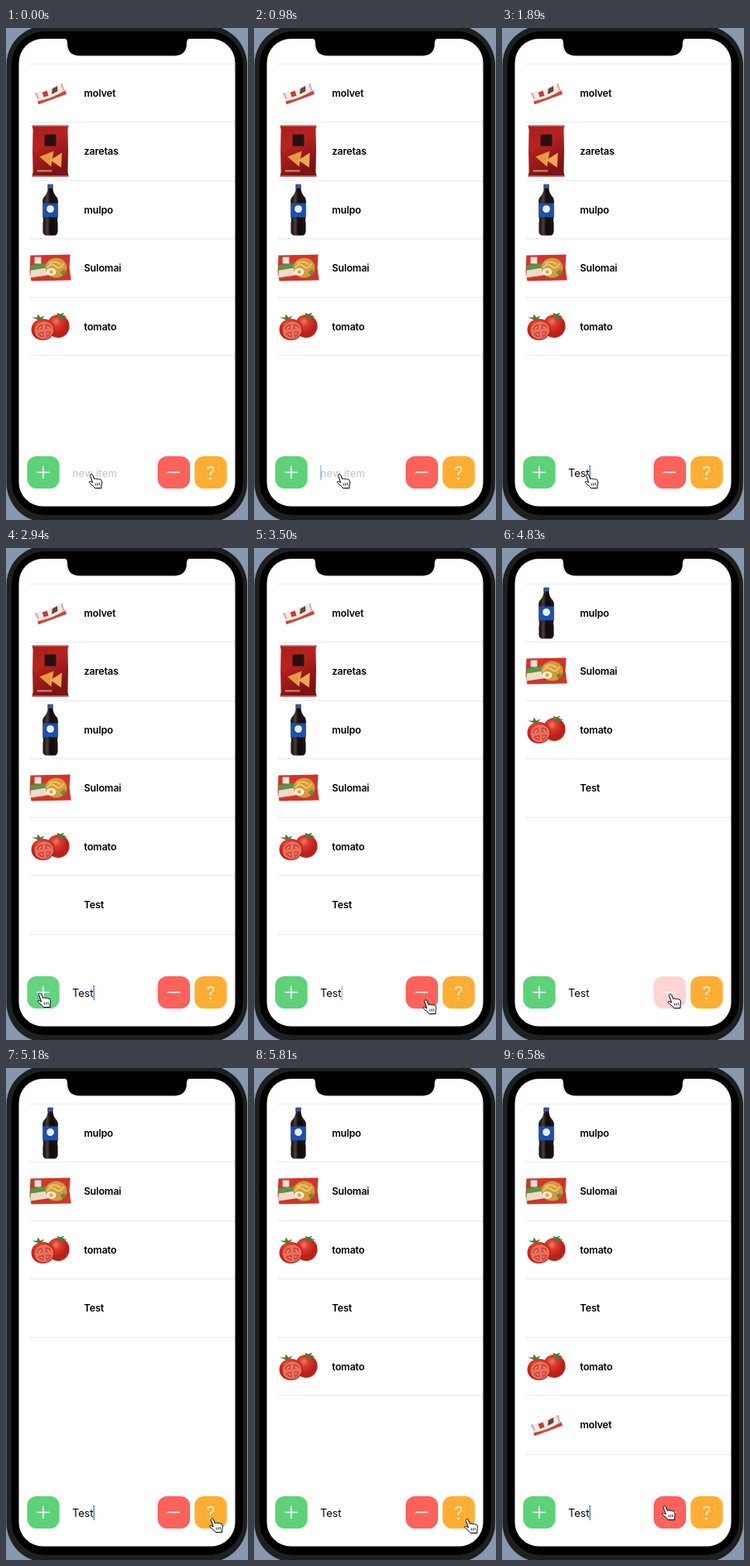
Write an HTML page that moves like this. It is 292 by 594 pixels and loops after 6.65 s.

```html
<!DOCTYPE html>
<html lang="en">
<head>
<meta charset="utf-8">
<title>Shopping list</title>
<style>
  html, body { margin: 0; height: 100%; overflow: hidden; background: #8798ae; }
  svg { display: block; width: 292px; height: 594px; }
  text { font-family: Inter, "Liberation Sans", sans-serif; }
  .label { font-size: 12px; font-weight: 600; letter-spacing: -.2px; }
  .field { font-size: 12.7px; }
  .icon { fill: none; stroke: #fff; stroke-width: 1.6; stroke-linecap: round; }
  .mark { font-size: 21.5px; font-weight: 300; fill: #fff; text-anchor: middle; }
</style>
</head>
<body>
<svg viewBox="0 0 292 594">
  <defs>
    <linearGradient id="bag" x2=".4" y2="1">
      <stop stop-color="#a51f1c"/><stop offset=".4" stop-color="#b9231f"/><stop offset="1" stop-color="#7c1212"/>
    </linearGradient>
    <linearGradient id="glass" x2="1">
      <stop stop-color="#0c0808"/><stop offset=".3" stop-color="#4a3b3a"/><stop offset=".5" stop-color="#120b0b"/><stop offset="1" stop-color="#1b1414"/>
    </linearGradient>
    <radialGradient id="skin" cx=".4" cy=".3">
      <stop stop-color="#f27a66"/><stop offset=".4" stop-color="#dd3b2d"/><stop offset="1" stop-color="#bb2219"/>
    </radialGradient>

    <g id="bar" transform="rotate(-20)">
      <path d="M-18-6H18L17 1 18 8H-18L-17 2Z" fill="#f0ebe7"/>
      <path d="M-18 4Q0 7 18 3V8H-18Z" fill="#cf4434"/>
      <path d="M-18-6h3v8l-2 0zM15-6h3l-1 7 1 3h-3z" fill="#dcb3aa"/>
      <rect x="-9" y="-4" width="6" height="6" fill="#c8382b"/>
      <path d="M1 2 4-4 11-5 9 1Z" fill="#6d4434"/>
    </g>
    <g id="chips">
      <path d="M-22-31H22L21-26Q22 0 21 25L22 31H-22L-21 25Q-22 0-21-26Z" fill="url(#bag)"/>
      <path d="M-22-30H22M-22 30H22" stroke="#c4615a"/>
      <rect x="-7" y="-20" width="14" height="14" fill="#241212"/>
      <path d="M-13 7 4 0 1 19Z" fill="#e89a45"/>
      <path d="M0 11 14 2 13 20Z" fill="#eda950"/>
      <path d="M-16 24H2" stroke="#c98a78" stroke-width="2"/>
    </g>
    <g id="cola">
      <path d="M-3-27H3Q3-20 8-15 10-12 9-7V8Q8 12 9 16V27Q8 31 5 31H-5Q-8 31-9 27V16Q-8 12-9 8V-7Q-10-12-8-15-3-20-3-27Z" fill="url(#glass)"/>
      <rect x="-3.5" y="-31" width="7" height="5" rx="1" fill="#3c5795"/>
      <rect x="-9" y="-8" width="18" height="17" fill="#1d4fae"/>
      <circle cy="-1" r="4.5" fill="#e9edf5"/>
    </g>
    <g id="noodles">
      <path d="M-24-15 24-16 23 0 25 15-23 16-25 5Z" fill="#cf3528"/>
      <path d="M-24 3-5 0-3 9-24 12Z" fill="#ecdcc8"/>
      <path d="M-24-3-3-6V-1L-24 3Z" fill="#4e9a4a"/>
      <rect x="-19" y="-13" width="8" height="8" fill="#f0e4dc"/>
      <ellipse cx="7" cy="0" rx="13" ry="12" fill="#d29a3c"/>
      <path d="M-4 0q5-7 10-2t10-3M-2-5q8-5 14 1" fill="none" stroke="#edc766" stroke-width="2"/>
      <ellipse cx="1" cy="5" rx="6" ry="4.5" fill="#f8f0e2"/><circle cx="1" cy="5" r="2.3" fill="#eda626"/>
      <path d="M12 5l5-3 2 5-4 3z" fill="#6b8a3c"/>
    </g>
    <g id="tomato">
      <ellipse cx="9.5" cy="-.5" rx="13.5" ry="14" fill="url(#skin)"/>
      <path d="M10-12l-6-1 5-1-1-3 4 2 5-2-2 3 6 2-6 0 1 4z" fill="#4c7a35"/>
      <ellipse cx="-9" cy="3.5" rx="14" ry="13" fill="url(#skin)"/>
      <path d="M-15-8l-7-3 6 0 1-4 3 4 5-2-3 4z" fill="#4c7a35"/>
      <ellipse cx="-7.5" cy="4.5" rx="11.5" ry="10.5" fill="#e8705f" transform="rotate(-20 -7.5 4.5)"/>
      <path d="M-16 4q0-6 6-7l1 6zM-6-3q7 0 7 5l-7 1zM-15 8l7-2 0 7q-5 0-7-5zM-5 6l6 0q-1 6-6 7z" fill="#d24536"/>
      <path d="M-14 3l3-3M-4 0l3 2M-12 9l3 1M-4 9l2-1" stroke="#f0b098" stroke-width="1.3"/>
    </g>
  </defs>

  <rect x=".5" y="-3" width="290.5" height="600" rx="48" fill="#1e1f20"/>
  <rect x="6.5" y="4" width="279.5" height="584" rx="41"/>
  <rect x="15.5" y="13" width="261" height="564.5" rx="29" fill="#fff"/>
  <path d="M68 12q6 0 6 6 0 15.5 15 15.5h114q15 0 15-15.5 0-6 6-6z"/>

  <path id="lines" stroke="#ebebed"/>
  <g id="rows"></g>

  <g id="plus">
    <rect x="25.5" y="517" width="39" height="39" rx="11.5" fill="#5dd279"/>
    <path class="icon" d="M38 536.5h14M45 529.5v14"/>
  </g>
  <text id="typed" class="field" x="80" y="541.5"></text>
  <rect id="caret" y="528" width="1.2" height="18" fill="#2f6bdc"/>
  <g id="minus">
    <rect x="183" y="517" width="39" height="39" rx="11.5" fill="#ff625b"/>
    <path class="icon" d="M195.5 536.5h14"/>
  </g>
  <g id="random">
    <rect x="227.5" y="517" width="39" height="39" rx="11.5" fill="#ffad33"/>
    <text class="mark" x="247" y="544.5">?</text>
  </g>
  <g id="hand" stroke="#000" stroke-linejoin="round">
    <path fill="#fff" d="M1.6 2.4C1 .6 4 .1 4.8 1.8L6.6 6.6C7.4 5.6 9.2 5.7 9.6 6.8 10.5 5.9 12.2 6.1 12.6 7.2 13.7 6.5 15 7 15.2 8.2 16 10.5 16 12 15 14L15.2 17.5H7.4C6 14.8 2.8 13.4.6 11-.3 9.8 1.2 8.8 2.6 9.6L4.6 10.8Z"/>
    <path d="M8.4 11.5v3M10.6 11.3v3M12.8 11v3" stroke-width=".8"/>
  </g>
</svg>
<script>
const LOOP = 6650, STEP = 70, FADE = 170;
const $ = id => document.getElementById(id);
const clamp = v => Math.max(0, Math.min(1, v));
const since = (times, t) => times.filter(s => t >= s).length;

// label, picture, time of appearance
const items = [
  ["molvet", "bar", 0], ["zaretas", "chips", 0], ["mulpo", "cola", 0],
  ["Sulomai", "noodles", 0], ["tomato", "tomato", 0],
  ["Test", "", 2780], ["tomato", "tomato", 5640], ["molvet", "bar", 5950]
];
const removals = [4450, 4815];
const keys = [1190, 1610, 1750, 1890];
const presses = {
  plus: [[2660, 2780]],
  minus: [[4340, 4450], [4620, 4815]],
  random: [[5600, 5640]]
};
// caret switches on, off, on, ...
const blinks = [280, 980, 1190, 2100, 2380, 3080, 3500, 3850, 4270, 4690, 5110, 5600, 5950];
// start, end, x, y
const moves = [
  [2380, 2640, 38, 537], [3080, 3490, 204, 545], [3780, 3990, 200, 538],
  [4970, 5250, 254, 544], [6370, 6580, 193, 528]
];

$("rows").innerHTML = items.map(([label, pic]) => `<g>
  ${pic && `<use href="#${pic}" x="53.5" y="35.5"/>`}
  <text class="label" x="94" y="40.4">${label}</text></g>`).join("");
const rows = [...$("rows").children];
const rowTop = i => Math.floor(43 + 70.5 * i);

function drawList(t) {
  const gone = since(removals, t);
  let lines = "M28 43.5H276";
  rows.forEach((row, i) => {
    const shown = i >= gone && t >= items[i][2];
    row.style.display = shown ? "" : "none";
    row.setAttribute("transform", `translate(0 ${rowTop(i - gone)})`);
    if (shown) lines += `M28 ${rowTop(i - gone + 1) + .5}H276`;
  });
  $("lines").setAttribute("d", lines);
}

function drawField(t) {
  const n = since(keys, t), typed = $("typed"), caret = $("caret");
  typed.textContent = n ? "Test".slice(0, n) : "new item";
  typed.style.fill = n ? "#000" : "#c4c4c6";
  caret.setAttribute("x", 80 + (n ? typed.getComputedTextLength() : 0));
  const k = since(blinks, t);
  const part = k ? clamp((t - blinks[k - 1] + STEP) / (2 * STEP)) : 1;
  caret.style.opacity = k % 2 ? part : 1 - part;
}

function drawButtons(t) {
  for (const id in presses) {
    let alpha = 1;
    for (const [down, up] of presses[id])
      if (t >= down) alpha = .2 + .8 * clamp((t - up) / FADE);
    $(id).style.opacity = alpha;
  }
}

function drawHand(t) {
  let x = 100, y = 538;
  for (const [a, b, toX, toY] of moves) {
    const p = clamp((t - a) / (b - a)), e = p * p * (3 - 2 * p);
    x += (toX - x) * e;
    y += (toY - y) * e;
  }
  $("hand").setAttribute("transform", `translate(${x} ${y})`);
}

const start = performance.now();
function frame() {
  const t = Math.floor((performance.now() - start) % LOOP / STEP) * STEP;
  drawList(t);
  drawField(t);
  drawButtons(t);
  drawHand(t);
  requestAnimationFrame(frame);
}
frame();
</script>
</body>
</html>
```
